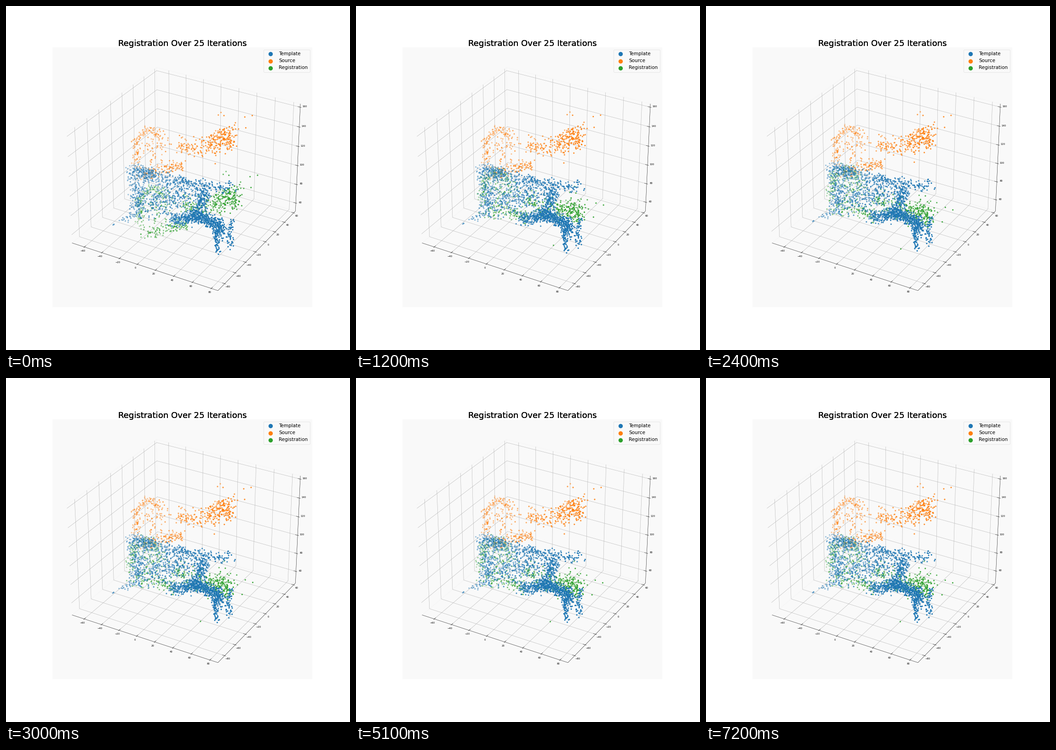
A matplotlib script that plays this animation: 748x748 px, repeating every 7500 ms.

```python
import numpy as np
import matplotlib.pyplot as plt
from matplotlib.animation import FuncAnimation
from matplotlib.collections import LineCollection
from matplotlib.colors import to_rgba

SIZE, FRAMES, INTERVAL = 748, 25, 300
PT = 11 / 20                      # type and line scale
rng = np.random.default_rng(4)
plt.rcParams["font.family"] = "DejaVu Sans"
plt.rcParams["axes.facecolor"] = "#f9f9f9"

# ---- camera: elevation 30, azimuth -60, distance 10 ----
BOX = np.array([4, 4, 3]) * 25 / 84
W = np.array([0.4330127, -0.75, 0.5])
U = np.array([0.8660254, 0.5, 0])
V = np.cross(W, U)
LEFT, SIDE, BOTTOM = 0.135 * SIZE, 0.755 * SIZE, 0.875 * SIZE
SCALE = SIDE / 0.185
CX, CY = LEFT + 0.095 * SCALE, BOTTOM - 0.095 * SCALE


def project(frac):
    """Box fractions (0..1 per axis) to stage pixels."""
    p = (np.asarray(frac, float) - 0.5) * BOX
    k = SCALE / (10 - p @ W)
    return np.stack([CX + k * (p @ U), CY - k * (p @ V)], -1)


def lift(xy, depth):
    """Stage pixels at a given depth back to box fractions."""
    k = (10 - depth) / SCALE
    a, b = (xy[:, 0] - CX) * k, (CY - xy[:, 1]) * k
    p = depth[:, None] * W + a[:, None] * U + b[:, None] * V
    return p / BOX + 0.5


def limits(i):
    """Data limits, settling as the registered cloud settles."""
    x_max = 88.4 + 5.4 * np.exp(-i / 2) - 6.8 * np.exp(-2 * i)
    z_min = min(51.3, 46.3 + 15.8 * np.exp(-i / 2.9))
    return np.array([-74.3, -92.6, z_min]), np.array([x_max, 63.8, 163.4])


# ---- point clouds: jittered trails through a few stage points ----
def trail(n, spread, *path):
    path = np.array(path, float)
    run = np.r_[0, np.hypot(*np.diff(path, axis=0).T).cumsum()]
    s = rng.uniform(0, run[-1], n)
    spine = np.stack([np.interp(s, run, c) for c in path.T], -1)
    return spine + spread * rng.uniform(-1, 1, (2, n, 2)).sum(0)


def place(*parts):
    """Join trails, give them depth, and sort far to near."""
    xy = np.vstack(parts)
    depth = (xy - 360) @ [0.0025, 0.0015] + rng.normal(0, 0.1, len(xy))
    depth = np.clip(depth, -0.45, 0.45)
    order = np.argsort(depth)
    return xy[order], depth[order]


def to_data(xy, depth):
    lo, hi = limits(FRAMES)
    return lo + lift(xy, depth) * (hi - lo)


def shaded(color, depth):
    rgba = np.tile(to_rgba(color), (len(depth), 1))
    rgba[:, 3] = 0.3 + 0.7 * (depth - depth.min()) / np.ptp(depth)
    return rgba


tpl_xy, tpl_depth = place(
    trail(210, 10, (268, 352), (318, 362)),
    trail(170, 8, (318, 362), (405, 382), (440, 386)),
    trail(50, 8, (442, 392), (490, 386)),
    trail(160, 11, (282, 375), (290, 448)),
    trail(22, 4, (282, 440), (234, 467)),
    trail(320, 23, (305, 412), (390, 405)),
    trail(230, 9, (430, 395), (410, 460)),
    trail(560, 8, (362, 459), (415, 450), (462, 468), (458, 492)),
    trail(45, 3, (453, 490), (459, 529)),
    trail(55, 5, (488, 460), (482, 490), (490, 518)),
)
src_xy, src_depth = place(
    trail(180, 16, (448, 300), (486, 276)),
    trail(95, 12, (370, 300), (440, 305)),
    trail(120, 6, (283, 338), (283, 288), (308, 266), (342, 278)),
    trail(60, 18, (300, 310), (335, 302)),
    trail(110, 8, (286, 360), (325, 355), (385, 340)),
    [(466, 230), (460, 236), (472, 238), (533, 238), (517, 241), (519, 264)],
)
OUTLIER = (453, 339)
src_xy = np.vstack([src_xy, OUTLIER])
src_depth = np.append(src_depth, 0.2)
tpl_data, src_data = to_data(tpl_xy, tpl_depth), to_data(src_xy, src_depth)

# ---- registration: affine map of three anchors, eased, plus a depth lean ----
ANCHORS = np.array([[533, 238, 1], [311, 260, 1], [300, 366, 1]])
START = np.array([[547, 368], [320, 391], [309, 500]])
END = np.array([[538, 441], [313, 355], [281, 435]])
lean = np.clip(rng.normal(0, 0.15, len(src_xy)), -0.4, 0.4)
lean[-1] = 1


def registered(i):
    rest = np.exp(-i / 2.2)
    affine = np.linalg.solve(ANCHORS, END + (START - END) * rest)
    flat = np.c_[src_xy, np.ones(len(src_xy))] @ affine
    return flat + (1 - rest) * lean[:, None] * np.array([-16, 45])


# ---- stage ----
fig = plt.figure(figsize=(11, 11), dpi=68, facecolor="white")
ax = fig.add_axes([0.135, 0.125, 0.755, 0.755])
ax.set(xlim=(LEFT, LEFT + SIDE), ylim=(BOTTOM, BOTTOM - SIDE),
       xticks=[], yticks=[])
ax.spines[:].set_visible(False)

PANES = [
    [(0, 0, 0), (0, 1, 0), (0, 1, 1), (0, 0, 1)],
    [(0, 1, 0), (1, 1, 0), (1, 1, 1), (0, 1, 1)],
    [(0, 0, 0), (1, 0, 0), (1, 1, 0), (0, 1, 0)],
]
EDGES = [[(0, 0, 0), (1, 0, 0), (1, 1, 0)], [(1, 1, 0), (1, 1, 1)]]


def lines(paths, color, width, z):
    segs = [project(p) for p in paths]
    return ax.add_collection(
        LineCollection(segs, colors=color, linewidths=width * PT, zorder=z),
        autolim=False)


lines(PANES, "#f2f2f2", 1, 0.5)
grid = lines([], "#b0b0b0", 1.1, 1)
lines(EDGES, "black", 1, 1.2)
ticks = lines([], "black", 1, 1.2)

VALUES = [range(-60, 81, 20), range(-80, 61, 20), range(60, 161, 20)]
TICKS = [(axis, v) for axis in range(3) for v in VALUES[axis]]
labels = [ax.text(0, 0, str(v).replace("-", "\u2212"), fontsize=10 * PT,
                  ha="center", va="center", zorder=1.5) for _, v in TICKS]
OUT, IN, PAD = 0.008, 0.016, 0.0203


def tick_parts(axis, t):
    """Grid path, tick mark and label anchor in box fractions."""
    if axis == 0:
        return ([(t, 0, 0), (t, 1, 0), (t, 1, 1)],
                [(t, -OUT, 0), (t, IN, 0)], (t, -PAD, -PAD))
    if axis == 1:
        return ([(1, t, 0), (0, t, 0), (0, t, 1)],
                [(1 + OUT, t, 0), (1 - IN, t, 0)], (1 + PAD, t, -PAD))
    return ([(0, 0, t), (0, 1, t), (1, 1, t)],
            [(1 + OUT, 1, t), (1 - IN, 1, t)], (1 + PAD, 1 + PAD, t))


DOT = dict(s=36 * PT ** 2, linewidths=0)


def dots(color, depth, z):
    n = np.zeros(len(depth))
    return ax.scatter(n, n, color=shaded(color, depth), zorder=z, **DOT)


source = dots("C1", src_depth, 2)
moving = dots("C2", src_depth, 3)
template = dots("C0", tpl_depth, 4)

names = ["Template", "Source", "Registration"]
handles = [ax.scatter([], [], color=f"C{k}", **DOT) for k in range(3)]
legend = ax.legend(handles, names, loc="upper right", fontsize=20 * PT,
                   markerscale=3)
legend.get_frame().set_linewidth(PT)
legend.set_zorder(6)

# stacked copies give the title its heavier edge
for _ in range(3):
    ax.text(LEFT + SIDE / 2, BOTTOM - SIDE - 3.1,
            "Registration Over 25 Iterations", fontsize=35 * PT,
            ha="center", va="baseline", zorder=6)


def update(i):
    lo, hi = limits(i)
    grid_paths, marks = [], []
    for (axis, value), label in zip(TICKS, labels):
        t = (value - lo[axis]) / (hi[axis] - lo[axis])
        path, mark, spot = tick_parts(axis, t)
        grid_paths.append(project(path))
        marks.append(project(mark))
        label.set_position(project(spot))
    grid.set_segments(grid_paths)
    ticks.set_segments(marks)
    template.set_offsets(project((tpl_data - lo) / (hi - lo)))
    source.set_offsets(project((src_data - lo) / (hi - lo)))
    moving.set_offsets(registered(i))
    return [grid, ticks, template, source, moving, *labels]


anim = FuncAnimation(fig, update, frames=FRAMES, interval=INTERVAL,
                     repeat=True, repeat_delay=0, blit=False)
plt.show()
```
